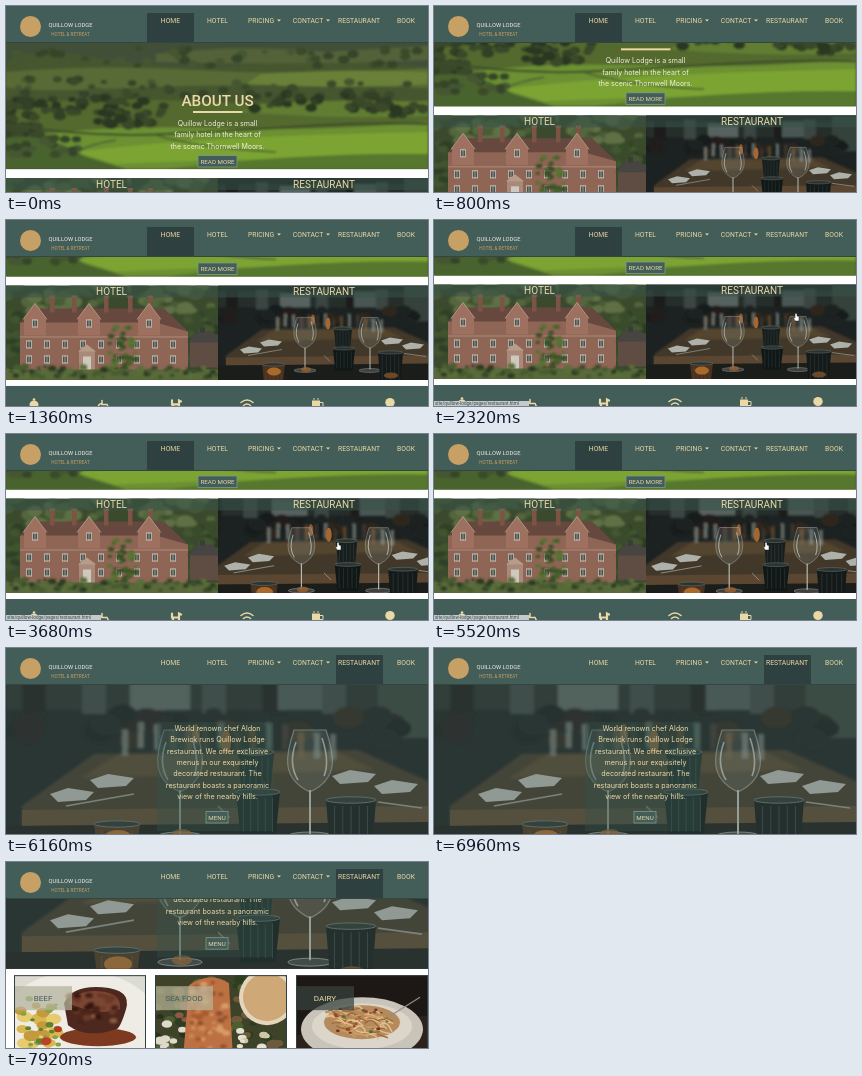
Animation of 422x186 px, one loop 8000 ms. Source, as an HTML page:

```html
<!DOCTYPE html>
<html lang="en">
<head>
<meta charset="utf-8">
<title>Hotel website tour</title>
<style>
html, body { margin: 0; width: 100%; height: 100%; overflow: hidden; background: #fff; }
svg { display: block; width: 100vw; height: 100vh; }
text { font-family: Roboto, sans-serif; text-anchor: middle; }
.copy { font-family: Inter, sans-serif; }
</style>
</head>
<body>
<svg id="stage" viewBox="0 0 422 186"></svg>
<script>
const TEAL = '#435d58', DARK = '#2e403f', GOLD = '#c6a064', CREAM = '#ead9a6';
const LOOP = 8000;

let seed = 7;
const rnd = (a = 0, b = 1) => {
  seed = (seed * 16807) % 2147483647;
  return a + (b - a) * seed / 2147483647;
};
const pick = list => list[Math.floor(rnd(0, list.length))];
const many = (n, fn) => Array.from({ length: n }, (_, i) => fn(i)).join('');

const rect = (x, y, w, h, fill, more = '') =>
  `<rect x="${x}" y="${y}" width="${w}" height="${h}" fill="${fill}" ${more}/>`;
const oval = (x, y, rx, ry, fill, more = '') =>
  `<ellipse cx="${x}" cy="${y}" rx="${rx}" ry="${ry}" fill="${fill}" ${more}/>`;
const path = (d, fill, more = '') => `<path d="${d}" fill="${fill}" ${more}/>`;
const line = (d, stroke, w = 1, more = '') =>
  `<path d="${d}" fill="none" stroke="${stroke}" stroke-width="${w}" ${more}/>`;
const text = (x, y, s, size, fill = CREAM, more = '') =>
  `<text x="${x}" y="${y}" font-size="${size}" fill="${fill}" ${more}>${s}</text>`;
const group = (body, more = '') => `<g ${more}>${body}</g>`;
const soft = body => group(body, 'filter="url(#soft)"');
const copy = (lines, y, step, size, fill) =>
  lines.map((s, i) => text(211.5, y + i * step, s, size, fill, 'class="copy"')).join('');
const button = (x, y, w, s) =>
  rect(x, y, w, 11.5, TEAL, 'stroke="#82978a" stroke-width=".8"') +
  text(x + w / 2, y + 8.2, s, 6.2);

// Clumps of foliage scattered over a box
const trees = (n, x, y, w, h, size, tones) => many(n, () => {
  const r = rnd(size * 0.5, size);
  return oval(rnd(x, x + w).toFixed(1), rnd(y, y + h).toFixed(1), r.toFixed(1), (r * 0.7).toFixed(1), pick(tones));
});

function valley() {
  const deep = ['#2a3822', '#313f27', '#3a4a2b'], mid = ['#3b4b2c', '#455731', '#34452a'];
  return rect(0, 0, 422, 163, '#46562f') +
    soft(path('M0 30H422V62Q330 50 250 58T90 52T0 60Z', '#435039') +
      path('M150 48Q230 38 320 46L422 40V54Q300 60 150 56Z', '#536238') +
      trees(50, 0, 42, 422, 18, 6, mid) +
      path('M0 66Q90 58 190 64T422 62V82Q250 76 120 82T0 78Z', '#586b35') +
      path('M255 68Q340 62 422 66V78Q330 84 240 78Z', '#698039') +
      trees(60, 0, 72, 422, 20, 6, mid) +
      path('M0 98Q100 90 210 96T422 94V130H0Z', '#52692f') +
      path('M250 98Q340 92 422 96V110Q330 114 235 106Z', '#617d33') +
      trees(50, 0, 92, 160, 18, 7, deep) + trees(36, 245, 88, 177, 16, 7, deep) +
      path('M0 134Q90 118 200 122T422 116V163H0Z', '#6c9030') +
      path('M70 146Q190 130 422 126V150Q250 152 110 158Z', '#7ca431') +
      trees(30, 0, 94, 34, 42, 9, deep) + trees(16, 90, 106, 60, 14, 7, deep) +
      trees(16, 365, 98, 57, 14, 7, deep) +
      line('M0 118Q80 132 160 128T300 120T422 118', '#3d4c2b', 2) +
      line('M55 163Q60 142 110 134M150 129Q190 142 270 146', '#4a5b30', 1.5) +
      path('M0 132Q40 126 78 150L120 163H0Z', '#4a632d') +
      trees(24, 0, 132, 72, 18, 6, mid) +
      path('M160 163Q300 146 422 148V163Z', '#57782e'));
}

function manor() {
  const brick = '#8f6555', roof = '#66483f', pale = '#c9c1b4';
  const pane = (x, y, w = 6, h = 8) => rect(x, y, w, h, pale) + rect(x + 0.8, y + 1, w - 1.6, h - 2, '#4e5452') +
    line(`M${x + w / 2} ${y}v${h}`, pale, 0.6);
  const gable = x => path(`M${x} 50V33L${x + 11} 18L${x + 22} 33V50Z`, '#9d7060') +
    line(`M${x - 1} 34L${x + 11} 18L${x + 23} 34`, '#bba392', 0.8) + pane(x + 8, 34);
  const chimney = x => rect(x, 11, 4.5, 16, '#7d5346') + rect(x - 0.6, 10, 5.7, 2, '#a67663');
  return rect(0, 0, 212, 94.5, '#3b4a2d') +
    soft(trees(70, 0, 0, 212, 26, 9, ['#3a4a2e', '#485b36', '#53663c', '#5f7044']) +
      trees(40, 170, 26, 42, 48, 8, ['#2b3a23', '#384b2a', '#435630']) +
      trees(14, 0, 28, 14, 48, 7, ['#2f3f26', '#41552f'])) +
    path('M14 38L24 23H158L180 44V50H14Z', roof) +
    [44, 66, 98, 122, 142].map(chimney).join('') +
    path('M14 37H150L182 46V86H14Z', brick) +
    [18, 72, 132].map(gable).join('') +
    rect(14, 51, 168, 1, '#ad8b79') +
    many(9, i => pane(20 + i * 18, 55) + (i == 3 ? '' : pane(20 + i * 18, 70))) +
    soft(trees(40, 103, 42, 28, 42, 4, ['#46602b', '#587333', '#374f25'])) +
    rect(73, 65, 16, 21, '#a98a7a') + path('M72 66L81 59L90 66Z', '#b89c8a') +
    rect(77, 71, 8, 15, '#cdc9bd') +
    rect(184, 56, 28, 26, '#5f4c42') + path('M181 57L192 46H206L212 52V57Z', '#464541') + rect(194, 42, 5, 5, '#3b3b38') +
    rect(0, 84, 212, 10.5, '#59693a') +
    soft(trees(80, 0, 81, 212, 11, 4, ['#36492a', '#475c2f', '#5a6e3a', '#2c3b24']));
}

function wineGlass(x) {
  return path(`M${x - 8} 32C${x - 12} 44 ${x - 15} 56 ${x} 63C${x + 15} 56 ${x + 12} 44 ${x + 8} 32Z`,
    '#a9b2ac', 'fill-opacity=".16" stroke="#b4bcb6" stroke-opacity=".6" stroke-width=".6"') +
    line(`M${x - 7} 38Q${x - 11} 49 ${x - 6} 57M${x + 6} 36Q${x + 10} 48 ${x + 7} 55`, '#e6eae4', 0.8, 'opacity=".65"') +
    line(`M${x} 62V84`, '#b4b9b2', 1) +
    oval(x, 85, 11, 2, '#a9ada5', 'fill-opacity=".25" stroke="#b9bcb4" stroke-opacity=".7" stroke-width=".5"');
}

function tumbler(x, y, w, h, fill) {
  return path(`M${x} ${y}h${w}l${-w * 0.1} ${h}h${-w * 0.8}Z`, fill) +
    many(5, i => line(`M${x + w * (0.17 + i * 0.165)} ${y + 3}v${h - 5}`, '#5b6562', 0.5, 'opacity=".5"')) +
    oval(x + w / 2, y, w / 2, 1.6, '#2b3331', 'stroke="#66706d" stroke-width=".5"');
}

function dining() {
  const napkin = (x, y) => path(`M${x} ${y + 3}L${x + 9} ${y}L${x + 22} ${y + 2}L${x + 18} ${y + 6}L${x + 4} ${y + 7}Z`, '#aeb0aa');
  return rect(0, -10, 212, 120, '#1c2221') +
    soft(rect(0, 6, 212, 16, '#252d2b') +
      many(7, i => rect(8 + i * 30, 4, 12, 20, i % 2 ? '#3a4542' : '#1a1f1e')) +
      rect(62, 8, 30, 14, '#56625f') + rect(136, 6, 22, 16, '#4a5652') +
      rect(186, 0, 26, 36, '#34423a') +
      trees(30, 0, 24, 212, 14, 8, ['#191c1b', '#241f1b', '#2e261f', '#1f2423']) +
      path('M44 44L176 42L212 58V80H8V70Z', '#43372c') +
      path('M56 44L166 43L184 52L38 56Z', '#53452f') +
      many(14, i => rect(58 + i * 8, rnd(28, 34), 3, 13, pick(['#7a5530', '#7d8781', '#4a4037', '#8f9892']), 'opacity=".6"'))) +
    path('M8 72L212 70V79L8 80Z', '#5a4631') +
    path('M0 80L212 78V110H0Z', '#1b1d1b') +
    oval(110, 38, 2.5, 6, '#a5672f') + oval(95, 34, 2, 5, '#8c5a30') +
    napkin(22, 61) + napkin(42, 54) + napkin(163, 52) + napkin(184, 57) +
    line('M30 70L64 64M106 70L112 76M186 68L208 71', '#8e8f88', 0.8) +
    tumbler(116, 43, 18, 20, '#161e1d') + tumbler(115, 63, 22, 22, '#0f1717') +
    wineGlass(87) + wineGlass(152) +
    tumbler(44, 79, 23, 20, '#4a321e') + oval(56, 86, 7, 4, '#a9692b') +
    oval(88, 84, 5, 2.5, '#9c6130', 'opacity=".8"') +
    tumbler(160, 67, 25, 32, '#141a19') + oval(173, 90, 7, 3, '#6d4826');
}

function icons() {
  const s = (d, x, w = 1.5) => line(d, CREAM, w, `transform="translate(${x} 291)" stroke-linecap="round"`);
  return oval(28, 291, 4.5, 4, CREAM) + rect(23, 294, 10, 2, CREAM) + oval(28, 286, 1.3, 1.3, CREAM) +
    s('M-2 -4V0H3L5 4M-2 -1A4 4 0 1 0 2 4', 98) +
    s('M-4 -4V0H3V-4L5 -3M-3 0V5M3 0V5', 170, 2.2) +
    s('M-6 -2Q0 -7 6 -2M-3.5 1Q0 -2 3.5 1M0 4V4', 241) +
    rect(306, 287, 8, 8, CREAM) + s('M4 -2h3v4h-3M-2 -6v1M2 -6v1', 310, 1) +
    oval(384, 289, 4.7, 4.5, CREAM) + path('M380 294h8l-4 6Z', GOLD);
}

function homePage() {
  const tileTitle = (x, s) => rect(x - 106, 172, 212, 12, '#38524a', 'opacity=".55"') + text(x, 181.6, s, 10);
  return rect(0, 0, 422, 480, '#fff') + group(valley(), 'clip-path="url(#field)"') +
    text(211.5, 99.5, 'ABOUT US', 15.3, CREAM, 'font-weight="500"') + rect(187, 105, 49.5, 2, CREAM) +
    copy(['Quillow Lodge is a small', 'family hotel in the heart of', 'the scenic Thornwell Moors.'], 120, 11.3, 7, '#f1efdd') +
    button(192, 149.5, 39, 'READ MORE') +
    group(manor(), 'transform="translate(0 172)" clip-path="url(#tile)"') +
    group(group('<use href="#dining"/>', 'id="zoom"'), 'transform="translate(212 172)" clip-path="url(#tile)"') +
    tileTitle(105.5, 'HOTEL') + tileTitle(318, 'RESTAURANT') +
    rect(0, 272.5, 422, 200, TEAL) + icons();
}

function steak() {
  return rect(0, 0, 132, 90, '#dcdbd2') + oval(66, 50, 80, 54, '#eeece5') +
    trees(26, 2, 30, 40, 44, 8, ['#d9b64f', '#e6cb70', '#c59a3c']) +
    trees(20, 0, 14, 46, 62, 4, ['#5f8232', '#86a343']) +
    oval(84, 62, 38, 9, '#7d3a20') +
    path('M50 28Q58 10 88 12T112 34T102 54Q72 64 54 50Z', '#4d281e') +
    path('M54 28Q64 14 86 16T106 34Q86 42 54 28Z', '#7b4733') +
    soft(trees(26, 56, 20, 46, 34, 5, ['#4a2319', '#6b3826', '#8b5a40', '#35190f'])) +
    oval(32, 66, 5, 4, '#bd4029') + oval(44, 54, 4, 3, '#b53a25');
}

function salmon() {
  return rect(0, 0, 132, 90, '#3d4229') +
    trees(60, 0, 0, 132, 84, 7, ['#2d3e20', '#4c5f2f', '#6d5a3c', '#29301f']) +
    trees(12, 4, 30, 26, 50, 6, ['#ded9c8', '#8b5a44']) +
    oval(112, 22, 28, 28, '#e3d6bc') + oval(112, 22, 24, 24, '#cfa878') +
    path('M34 10Q54 -4 74 8L78 84H28Z', '#bd7143') +
    soft(trees(50, 36, 6, 36, 72, 4, ['#cf8a56', '#a8592f', '#d79c6c', '#93502d'])) +
    trees(10, 84, 54, 30, 24, 5, ['#e5e0cf', '#cfc6a8']);
}

function pasta() {
  return rect(0, 0, 132, 90, '#1d1816') + path('M0 60L132 40V90H0Z', '#2c211b') +
    oval(66, 54, 61, 32, '#c9c4ba') + oval(66, 51, 50, 23, '#dcd6ca') +
    oval(66, 47, 38, 17, '#b58a5c') +
    many(60, () => {
      const x = rnd(28, 84), y = rnd(34, 60);
      return line(`M${x} ${y}q${rnd(4, 10)} ${rnd(-9, 5)} ${rnd(12, 20)} ${rnd(-3, 7)}`, pick(['#c99c66', '#e0c08e', '#a06a3a']), 1.4);
    }) +
    trees(18, 38, 32, 54, 26, 2.5, ['#6f3622', '#566a33', '#97492c']) +
    line('M92 42L124 22', '#8f8e88', 1.2);
}

function restaurantPage() {
  const card = (x, s, art, shade, ink) => group(
    group(art, 'clip-path="url(#card)"') +
    rect(0, 11, 58, 24, shade, 'opacity=".72"') + text(29, 26, s, 8.1, ink) +
    rect(0.5, 0.5, 131, 89, 'none', `stroke="${DARK}"`), `transform="translate(${x} 201)"`);
  return rect(0, 0, 422, 420, '#fff') +
    group('<use href="#dining" transform="translate(0 18) scale(2)"/>' + rect(0, 0, 422, 195, '#4a645c', 'opacity=".3"'),
      'clip-path="url(#hero)"') +
    rect(151, 74, 116, 109, '#34504a', 'opacity=".4"') +
    copy(['World renown chef Aldon', 'Brewick runs Quillow Lodge', 'restaurant. We offer exclusive',
      'menus in our exquisitely', 'decorated restaurant. The', 'restaurant boasts a panoramic',
      'view of the nearby hills.'], 82.8, 11.35, 7.2, CREAM) +
    button(200, 163.5, 22, 'MENU') +
    card(8, 'BEEF', steak(), '#b3b39c', TEAL) +
    card(149, 'SEA FOOD', salmon(), '#b9b598', TEAL) +
    card(290, 'DAIRY', pasta(), '#38433f', CREAM);
}

function header() {
  const links = [[164.5, 'HOME'], [211.5, 'HOTEL'], [255, 'PRICING'], [302, 'CONTACT'], [353, 'RESTAURANT'], [400, 'BOOK']];
  return rect(0, 0, 422, 36.5, TEAL) + rect(0, 36, 422, 1, '#33463f') +
    rect(141, 7, 47, 29, DARK, 'id="active"') +
    oval(24.5, 20.5, 10.5, 10.5, GOLD) +
    text(64.5, 20.5, 'QUILLOW LODGE', 5.8, '#f0eee5') +
    text(64.5, 29.5, 'HOTEL &amp; RETREAT', 4.6, GOLD) +
    links.map(([x, s]) => text(x, 16.8, s, 6.8)).join('') +
    [273, 322].map(x => path(`M${x - 2} 13.5h4l-2 2Z`, CREAM)).join('');
}

const stage = document.getElementById('stage');
stage.innerHTML =
  `<defs><filter id="soft"><feGaussianBlur stdDeviation=".8"/></filter>
  <clipPath id="field">${rect(0, 0, 422, 163.5, '#000')}</clipPath>
  <clipPath id="tile">${rect(0, 0, 212, 94.5, '#000')}</clipPath>
  <clipPath id="hero">${rect(0, 0, 422, 194.5, '#000')}</clipPath>
  <clipPath id="card">${rect(0, 0, 132, 90, '#000')}</clipPath>
  <g id="dining">${dining()}</g></defs>` +
  group(homePage(), 'id="home"') + group(restaurantPage(), 'id="restaurant"') + header() +
  group(rect(0, 181, 95, 5, '#c3cacb') +
    text(1, 185, 'site/quillow-lodge/pages/restaurant.html', 4.6, '#3f484a', 'style="text-anchor:start"'), 'id="status"') +
  group(path('M-1 -3.5V1L-3 0L-1 4H3V-.5L1 -1V-3.5Z', '#fff', 'stroke="#222" stroke-width=".5"'), 'id="hand"');

const el = Object.fromEntries(['home', 'restaurant', 'active', 'zoom', 'status', 'hand']
  .map(id => [id, document.getElementById(id)]));
const smooth = (t, a, b) => {
  const u = Math.min(1, Math.max(0, (t - a) / (b - a)));
  return u * u * (3 - 2 * u);
};
const show = (node, on) => node.setAttribute('display', on ? 'inline' : 'none');
const move = (node, x, y) => node.setAttribute('transform', `translate(${x} ${y})`);

// The picture steps every 80 ms and rests on each fourth step of five
function heldTime(t) {
  const step = Math.floor(t / 80);
  return (step % 5 === 3 ? step - 1 : step) * 80;
}

function draw(now) {
  const t = heldTime(now % LOOP);
  const clicked = t >= 5920, hover = t >= 2240 && !clicked;
  show(el.home, !clicked);
  show(el.restaurant, clicked);
  show(el.status, hover);
  show(el.hand, hover);
  move(el.home, 0, -107.5 * smooth(t, 0, 1440));
  move(el.restaurant, 0, -93 * smooth(t, 7440, 8000));
  const k = 1 + 0.2 * (1 - (1 - smooth(t, 2240, 4160)) ** 1.5);
  el.zoom.setAttribute('transform', `translate(106 47) scale(${k}) translate(-106 -47)`);
  const m = smooth(t, 2320, 3520);
  move(el.hand, 362 - 30 * m, 97 + 15 * m);
  el.active.setAttribute('x', clicked ? 330 : 141);
}

let start;
function tick(now) {
  start ??= now;
  draw(now - start);
  requestAnimationFrame(tick);
}
draw(0);
requestAnimationFrame(tick);
</script>
</body>
</html>
```
